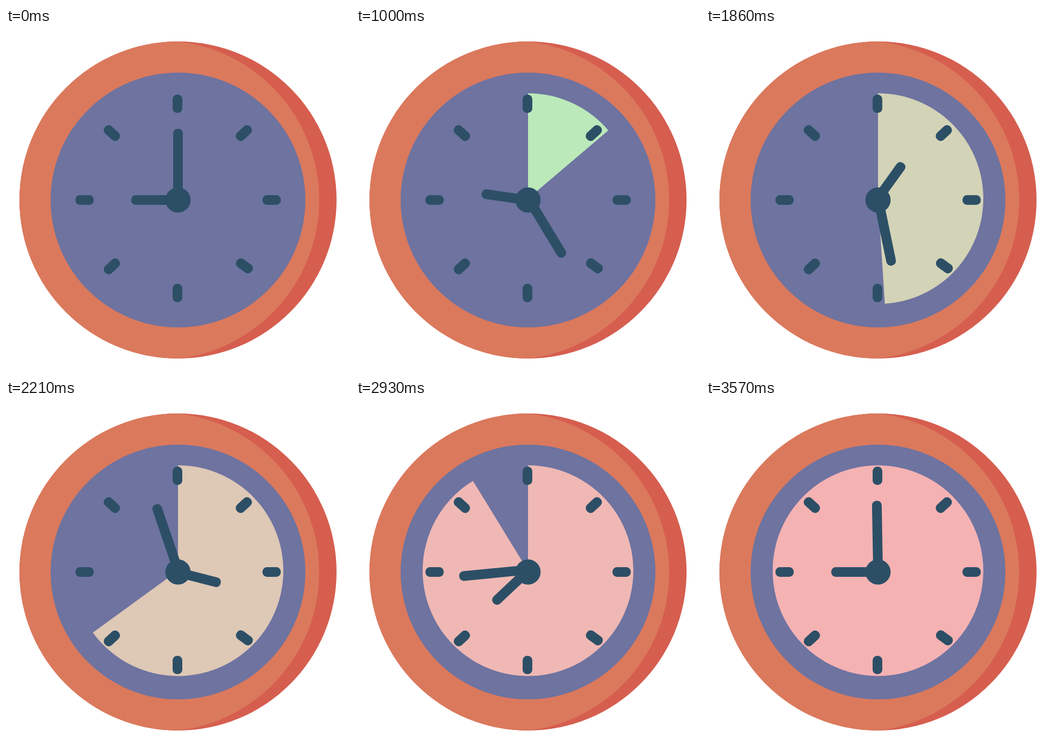
An HTML page that plays this animation: 640 by 640 pixels, repeating every 3870 ms.

```html
<!DOCTYPE html>
<html lang="en">
<head>
<meta charset="utf-8">
<title>Clock</title>
<style>
  html, body { margin: 0; width: 100%; height: 100%; overflow: hidden; background: #fff; }
  svg { display: block; width: 100%; height: 100%; }
  .dark { fill: #2c4f66; }
</style>
</head>
<body>
<svg viewBox="0 0 640 640">
  <defs>
    <rect id="tick" x="-17" y="-9" width="34" height="18" rx="8.3"/>
  </defs>

  <circle cx="320" cy="320" r="295" fill="#d65e4f"/>
  <path d="M320 25A295 295 0 0 0 320 615A297 297 0 0 0 320 25Z" fill="#db795c"/>
  <circle cx="320" cy="320" r="237" fill="#6e73a0"/>

  <path id="wedge"/>

  <g class="dark">
    <use href="#tick" transform="translate(319 141) rotate(90)"/>
    <use href="#tick" transform="translate(442.5 195.5) rotate(-43)"/>
    <use href="#tick" transform="translate(494.2 320)"/>
    <use href="#tick" transform="translate(443.5 442.5) rotate(36)"/>
    <use href="#tick" transform="translate(319 493) rotate(90)"/>
    <use href="#tick" transform="translate(197 443.5) rotate(-43)"/>
    <use href="#tick" transform="translate(146.2 320)"/>
    <use href="#tick" transform="translate(197 195.5) rotate(42)"/>
    <rect id="hour" x="233" y="311" width="85" height="18" rx="8.3"/>
    <rect id="minute" x="311" y="187.5" width="18" height="130" rx="8.3"/>
    <circle cx="320" cy="320" r="23.5"/>
  </g>
</svg>

<script>
  const LOOP = 3870, FPS = 14;
  const CX = 320, CY = 317.5, R = 196;
  const GREEN = [178, 242, 187], PINK = [245, 178, 179];

  const [wedge, hour, minute] =
    ['wedge', 'hour', 'minute'].map(id => document.getElementById(id));

  // Smooth ease in and out between two times in ms
  function ease(t, from, to) {
    const s = Math.min(1, Math.max(0, (t - from) / (to - from)));
    return s * s * (3 - 2 * s);
  }

  // Motion advances in 14 fps steps, on a 10 ms clock
  function stepTime(t) {
    const tick = Math.floor(t / 10) * 10;
    return Math.floor((tick + 5) * FPS / 1000) * 1000 / FPS;
  }

  function sector(p) {
    if (p <= 0) return '';
    const a = Math.min(p, 0.99999) * 2 * Math.PI;
    const x = CX + R * Math.sin(a), y = CY - R * Math.cos(a);
    return `M${CX} ${CY}V${CY - R}A${R} ${R} 0 ${p > 0.5 ? 1 : 0} 1 ${x} ${y}Z`;
  }

  function mix(p) {
    return `rgb(${GREEN.map((c, i) => Math.round(c + (PINK[i] - c) * p))})`;
  }

  function draw(now) {
    const t = stepTime(now % LOOP);
    const p = ease(t, 230, 3530);
    wedge.setAttribute('d', sector(p));
    wedge.setAttribute('fill', mix(p));
    minute.setAttribute('transform', `rotate(${1079 * p} 320 316)`);
    hour.setAttribute('transform', `rotate(${360 * ease(t, 750, 3530)} 317.5 320)`);
  }

  const start = performance.now();
  function frame() {
    draw(performance.now() - start);
    requestAnimationFrame(frame);
  }
  frame();
</script>
</body>
</html>
```
